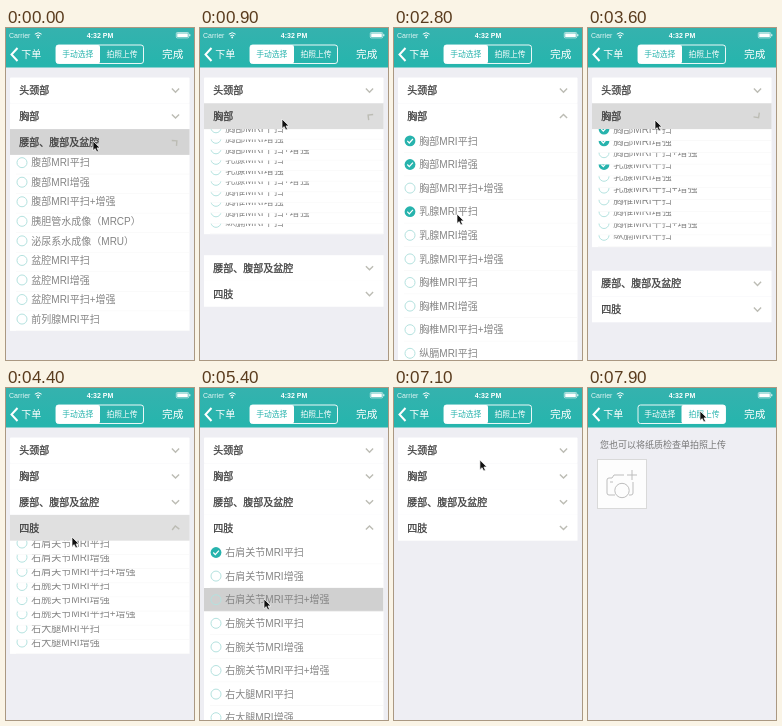
Write an HTML page that moves like this. It is 188 by 332 pixels and loops after 8000 ms.

```html
<!DOCTYPE html>
<html lang="zh-CN">
<head>
<meta charset="utf-8">
<style>
html, body { margin: 0; width: 100%; height: 100%; overflow: hidden; background: #eeeef3; }
svg { display: block; }
#stage { width: 100vw; height: 100vh; }
text { font-family: "Liberation Sans", "Noto Sans CJK SC", "Noto Sans CJK", sans-serif; }
.head { font-size: 10px; fill: #3a3a3a; stroke: #3a3a3a; stroke-width: .25px; }
.row { font-size: 10px; fill: #848484; }
</style>
</head>
<body>
<svg id="stage" viewBox="0 0 188 332"></svg>
<script>
const LOOP = 8000, STEP = 100, HEIGHT = 332;
const TOP = 49.5, HEAD_H = 25.8, ROW_H = 23.6;
const LEFT = 4, WIDTH = 179.5, TEAL = '#27b3ad';
const SWITCH_AT = 7600;

const scans = part => ['平扫', '增强', '平扫+增强'].map(kind => `${part}MRI${kind}`);
const scansOf = (...parts) => parts.flatMap(scans);

// opens / closes: start times of the fold animation
const sections = [
  { title: '头颈部', rows: [] },
  { title: '胸部', rows: scansOf('胸部', '乳腺', '胸椎', '纵膈'), opens: 761, closes: 3450 },
  { title: '腰部、腹部及盆腔', opens: -5000, closes: -79,
    rows: [...scans('腹部'), '胰胆管水成像（MRCP）', '泌尿系水成像（MRU）', ...scansOf('盆腔', '前列腺')] },
  { title: '四肢', rows: scansOf('右肩关节', '右腕关节', '右大腿', '右小腿'), opens: 4230, closes: 6150 },
];
const checks = [
  { section: 1, row: 0, at: 1600 }, { section: 1, row: 1, at: 2050 }, { section: 1, row: 3, at: 2600 },
  { section: 3, row: 0, at: 4950 }, { section: 3, row: 2, at: 5450 },
];
const pointerPath = [
  [0, 87, 113], [300, 87, 113], [700, 82, 91], [1150, 82, 91], [1450, 60, 114], [1700, 60, 114],
  [1950, 61, 137], [2150, 61, 137], [2450, 63, 186], [2900, 63, 186], [3300, 67, 92], [3700, 67, 92],
  [4050, 66, 149], [4550, 66, 149], [4800, 62, 167], [5000, 62, 167], [5250, 64, 211],
  [5550, 64, 211], [5950, 54, 132], [6700, 54, 132], [7450, 112, 23], [8000, 112, 23],
];

const clamp = v => Math.max(0, Math.min(1, v));
const ease = v => v * v * (3 - 2 * v);
const progress = (t, start, length) => ease(clamp((t - start) / length));

const rect = (x, y, w, h, fill, extra = '') =>
  `<rect x="${x}" y="${y}" width="${w}" height="${h}" fill="${fill}" ${extra}/>`;
const line = (d, color, width, extra = '') =>
  `<path d="${d}" fill="none" stroke="${color}" stroke-width="${width}" ${extra}/>`;
const label = (x, y, size, fill, content, extra = '') =>
  `<text x="${x}" y="${y}" font-size="${size}" fill="${fill}" ${extra}>${content}</text>`;

// Full while pressed, then fades out after release.
function pressAlpha(t, release, fade) {
  return t < release - 150 ? 0 : clamp(1 - (t - release) / fade);
}

function chevron(y, angle) {
  return line('M-3.6-1.8L0 1.8L3.6-1.8', '#bcbcb4', 1.4, `transform="translate(169.5 ${y}) rotate(${angle})"`);
}

function tickCircle(y, checked) {
  return checked
    ? `<circle cx="12" cy="${y}" r="5.4" fill="${TEAL}"/>` + line(`M9.3 ${y}l2 2.1l3.6-4`, '#fff', 1.2)
    : `<circle cx="12" cy="${y}" r="5" fill="none" stroke="#b4e2df"/>`;
}

function listRow(t, section, row, y, height) {
  const check = checks.find(c => c.section === section && c.row === row);
  const shift = height - ROW_H, middle = shift + ROW_H / 2;
  const alpha = check ? pressAlpha(t, check.at, 200) : 0;
  return `<svg x="${LEFT}" y="${y}" width="${WIDTH}" height="${height}">`
    + rect(0, shift, WIDTH, ROW_H, '#d0d0d0', `opacity="${alpha}"`)
    + line(`M6 ${height - .25}H${WIDTH}`, '#f1f1f1', .5)
    + tickCircle(middle, check && t >= check.at)
    + `<text class="row" x="21.3" y="${middle + 3.7}">${sections[section].rows[row]}</text></svg>`;
}

function list(t) {
  let y = TOP, out = '';
  sections.forEach(({ title, rows, opens, closes }, index) => {
    const middle = y + HEAD_H / 2, bodyTop = y + HEAD_H;
    let open = 0, angle = 0, alpha = 0;
    if (rows.length) {
      open = progress(t, opens, 300) - progress(t, closes, 300);
      angle = 180 * (clamp(progress(t, opens, 300) * 1.6) + clamp(progress(t, closes, 300) * 1.6));
      alpha = Math.max(pressAlpha(t, opens, 450), pressAlpha(t, closes, 600));
    }
    const height = ROW_H * open;
    const restTop = TOP + HEAD_H * (index + 1);
    const shown = Math.min(rows.length, Math.ceil((HEIGHT - restTop) / ROW_H));
    out += rect(LEFT, y, WIDTH, HEAD_H + shown * height, '#fff', index ? '' : 'rx="1"')
      + rect(LEFT, y, WIDTH, HEAD_H, '#cecece', `opacity="${alpha}"`)
      + `<text class="head" x="13.3" y="${middle + 3.7}">${title}</text>` + chevron(middle, angle);
    if (height > 0.1) {
      for (let row = 0; row < shown; row++) out += listRow(t, index, row, bodyTop + row * height, height);
    }
    y = bodyTop + rows.length * height;
  });
  return out;
}

function uploadPage() {
  return label(12, 60.3, 9, '#777', '您也可以将纸质检查单拍照上传')
    + rect(9.5, 71.5, 49, 49, '#fdfdfd', 'stroke="#d9d9d9"')
    + line('M36 87H26L24 90H21Q19 90 19 92V105Q19 107 21 107H27M41 107H43Q45 107 45 105V94', '#bdbdbd', 1)
    + line('M39 87H49M44 82V92M22 94H25', '#bdbdbd', 1)
    + '<circle cx="34" cy="102.5" r="7.2" fill="none" stroke="#bdbdbd"/>';
}

function navBar(uploading) {
  const [left, right] = uploading ? ['#fff', TEAL] : [TEAL, '#fff'];
  return '<defs><linearGradient id="bar" x2="0" y2="1"><stop stop-color="#35b2ae"/>'
    + '<stop offset="1" stop-color="#25b5ad"/></linearGradient></defs>'
    + rect(0, 0, 188, 39.5, 'url(#bar)')
    + label(3, 10, 7, '#e4f5f4', 'Carrier')
    + line('M28.8 6.2Q32.2 3.2 35.6 6.2M30.2 7.9Q32.2 6.2 34.2 7.9', '#fff', 1)
    + '<circle cx="32.2" cy="9.4" r=".9" fill="#fff"/>'
    + label(94, 10, 7, '#fff', '4:32 PM', 'text-anchor="middle" font-weight="bold"')
    + rect(170.3, 4.5, 12.4, 5.4, 'none', 'rx="1" stroke="#fff" stroke-width=".6"')
    + rect(171.2, 5.4, 10.6, 3.6, '#fff') + rect(183.3, 6.2, 1, 2, '#fff')
    + line('M11.5 20L5.5 26.5L11.5 33', '#fff', 2)
    + label(15.3, 30.2, 10, '#fff', '下单')
    + label(156, 30.4, 10.7, '#fff', '完成')
    + rect(uploading ? 93.5 : 50, 17, 44, 18.5, '#fff', 'rx="2"')
    + rect(50, 17, 87.5, 18.5, 'none', 'rx="2.5" stroke="#fff" stroke-width=".9"')
    + label(71.8, 29.1, 7.8, left, '手动选择', 'text-anchor="middle"')
    + label(116, 29.1, 7.8, right, '拍照上传', 'text-anchor="middle"');
}

function pointer(t) {
  const next = pointerPath.findIndex(p => p[0] > t);
  const [t0, x0, y0] = pointerPath[next - 1], [t1, x1, y1] = pointerPath[next];
  const k = progress(t, t0, t1 - t0);
  return `<path d="M0 0V9.6L2.2 7.6L3.8 11L5.5 10.2L4 6.9H7Z" fill="#111" stroke="#fff" stroke-width=".7"
    transform="translate(${x0 + (x1 - x0) * k} ${y0 + (y1 - y0) * k})"/>`;
}

const stage = document.getElementById('stage');
const start = performance.now();
let drawn = -1;

function render() {
  const t = Math.floor((performance.now() - start) % LOOP / STEP) * STEP;
  if (t !== drawn) {
    const uploading = t >= SWITCH_AT;
    stage.innerHTML = rect(0, 0, 188, HEIGHT, '#eeeef3')
      + (uploading ? uploadPage() : list(t)) + navBar(uploading) + pointer(t);
    drawn = t;
  }
  requestAnimationFrame(render);
}
render();
</script>
</body>
</html>
```
